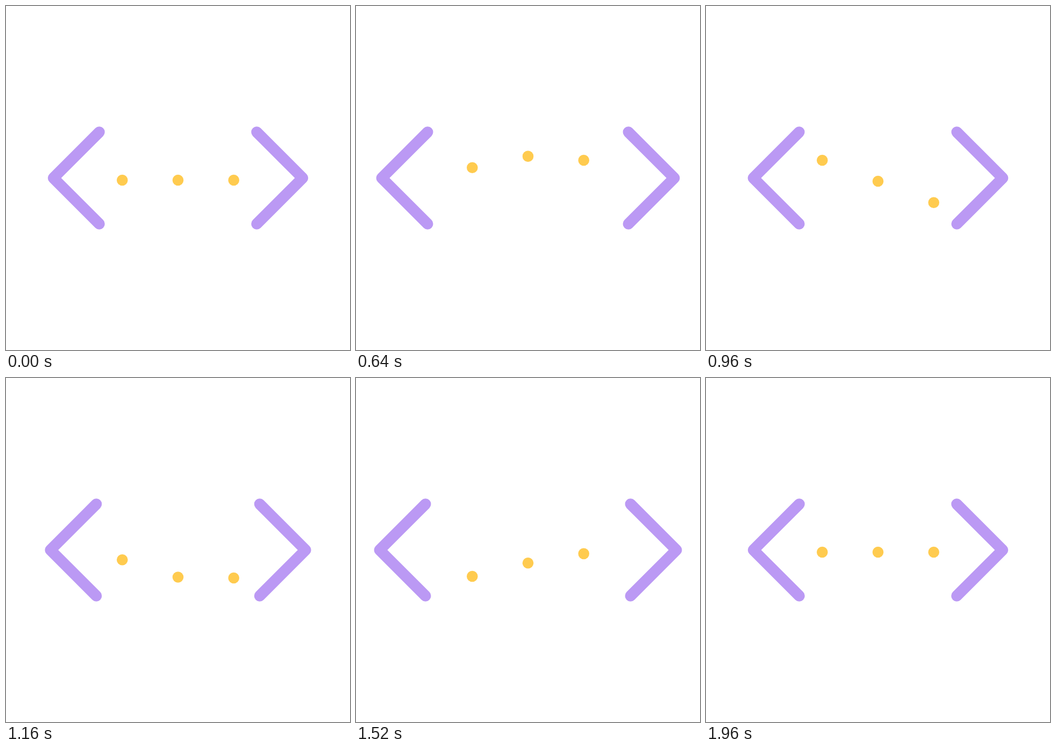
An HTML page that plays this animation: 640x640 px, repeating every 2000 ms.

```html
<!DOCTYPE html>
<html lang="en">
<head>
<meta charset="utf-8">
<title>Code loader</title>
<style>
  html, body { margin: 0; width: 100%; height: 100%; overflow: hidden; background: #fff; }
  svg { display: block; width: 100%; height: 100%; }
  path { fill: none; stroke: #bb99f4; stroke-width: 20.6; stroke-linecap: round; stroke-linejoin: round; }
  circle { fill: #ffcb4f; }
</style>
</head>
<body>
<svg viewBox="0 0 640 640">
  <path id="left" d="M173.5 234.6 L88.1 320 L173.5 405.4"/>
  <path id="right" d="M466.5 234.6 L551.9 320 L466.5 405.4"/>
  <circle cx="216.3" cy="324" r="10.3"/>
  <circle cx="320" cy="324" r="10.3"/>
  <circle cx="423.7" cy="324" r="10.3"/>
</svg>
<script>
const LOOP = 2000, STEP = 40, CYCLE = 24;

// Each key: [step, value, x1, x2]; x1 and x2 shape the ease towards the next key.
const SPREAD = [[0, 0, 0.68, 0.445], [12, 44.6, 0.6, 0.19], [24, 0]];
const BOUNCE = [[0, 0, 0.63, 0.57], [12, -45, 0.457, 0.55], [26, 50, 0.44, 0.43], [40, 0]];
const DELAYS = [8, 4, 0];

const left = document.getElementById('left');
const right = document.getElementById('right');
const dots = document.querySelectorAll('circle');

// Cubic bezier ease with handles (x1, 0) and (x2, 1).
function ease(p, x1, x2) {
  let lo = 0, hi = 1;
  for (let i = 0; i < 24; i++) {
    const s = (lo + hi) / 2, r = 1 - s;
    const x = 3 * r * r * s * x1 + 3 * r * s * s * x2 + s * s * s;
    if (x < p) lo = s; else hi = s;
  }
  return lo * lo * (3 - 2 * lo);
}

function valueAt(keys, step) {
  if (step <= keys[0][0]) return keys[0][1];
  for (let i = 1; i < keys.length; i++) {
    const [start, from, x1, x2] = keys[i - 1];
    const [end, to] = keys[i];
    if (step < end) return from + (to - from) * ease((step - start) / (end - start), x1, x2);
  }
  return keys[keys.length - 1][1];
}

function draw() {
  const time = performance.now() % LOOP;
  const step = Math.max(0, Math.floor(time / STEP) - 1);
  const spread = valueAt(SPREAD, step % CYCLE);
  left.setAttribute('transform', `translate(${-spread} 0)`);
  right.setAttribute('transform', `translate(${spread} 0)`);
  dots.forEach((dot, i) => dot.setAttribute('cy', 324 + valueAt(BOUNCE, step - DELAYS[i])));
  requestAnimationFrame(draw);
}
draw();
</script>
</body>
</html>
```
